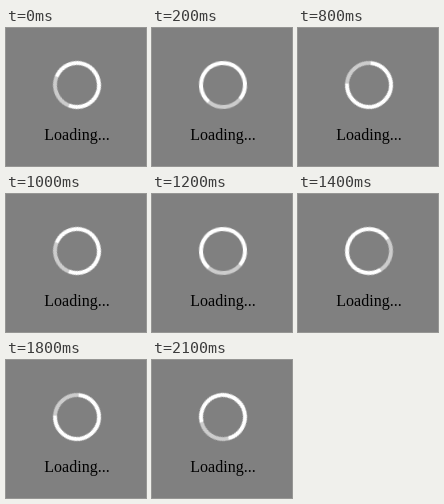
An HTML page for the animation above (2200 ms loop, 140 by 138 pixels).

```html
<!DOCTYPE html>
<html lang="en">
<head>
<meta charset="utf-8">
<title>Loading</title>
<style>
html, body {
  margin: 0;
  width: 100%;
  height: 100%;
  overflow: hidden;
  background: #808080;
}
.spinner {
  position: absolute;
  left: 47px;
  top: 33px;
  width: 48px;
  height: 48px;
  box-sizing: border-box;
  border: 4px solid #fff;
  border-bottom-color: #ccc;
  border-radius: 50%;
  /* 22 ticks of 36 degrees, counter-clockwise */
  animation: spin 2200ms steps(22) infinite;
}
.label {
  position: absolute;
  left: 0;
  top: 98px;
  width: 142px;
  text-align: center;
  font: 16px/18px "Liberation Serif", "Times New Roman", serif;
  color: #000;
}
@keyframes spin {
  from { transform: rotate(67deg); }
  to { transform: rotate(-725deg); }
}
</style>
</head>
<body>
<div class="spinner"></div>
<div class="label">Loading...</div>
</body>
</html>
```
